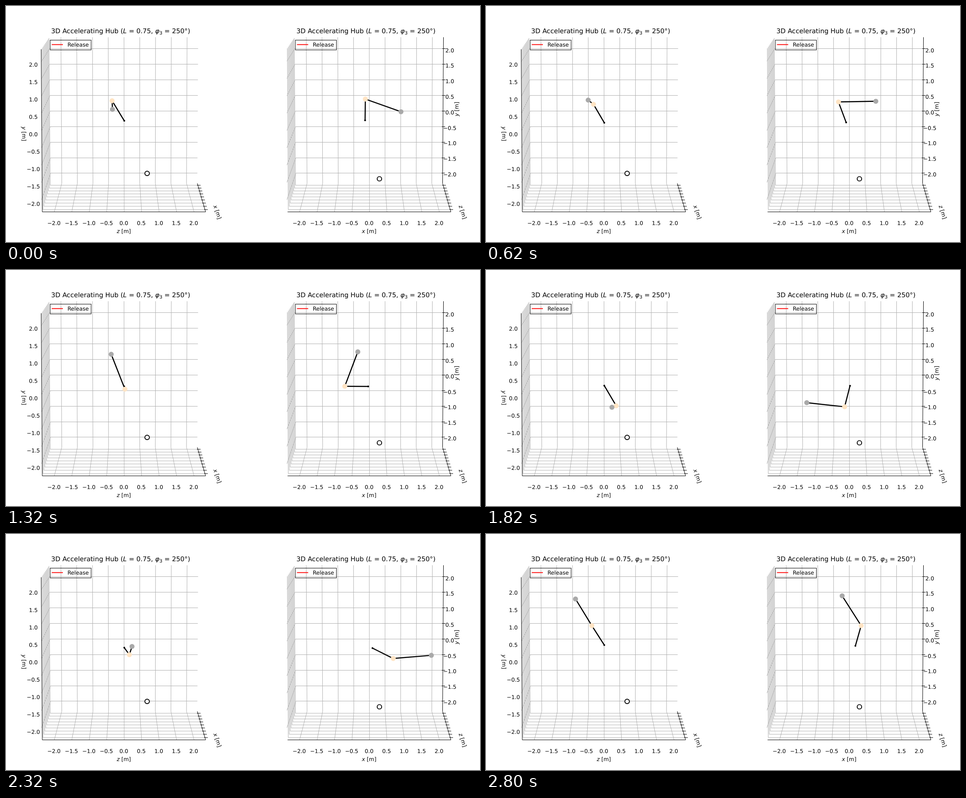
Write an HTML page that moves like this. It is 1058x529 px and loops after 2820 ms.

```html
<!DOCTYPE html>
<html lang="en">
<head>
<meta charset="utf-8">
<title>3D Accelerating Hub</title>
<style>
  html, body { margin: 0; width: 100%; height: 100%; overflow: hidden; background: #fff; }
  svg { display: block; width: 100%; height: 100%; }
  text { font: 12.2px "DejaVu Sans", sans-serif; text-anchor: middle; fill: #000; text-rendering: geometricPrecision; }
  text.title { font-size: 14.6px; }
  .i { font-style: italic; }
  .grid { stroke: #b0b0b0; stroke-width: 1; fill: none; }
  .axis { stroke: #000; stroke-width: 1; fill: none; }
  .rod { stroke: #000; stroke-width: 2.44; fill: none; stroke-linejoin: round; stroke-linecap: square; }
</style>
</head>
<body>
<svg id="stage" viewBox="0 0 1058 529"></svg>
<script>
const stage = document.getElementById('stage');
const LOOP = 2820, STEP = 20;
const ARM = 0.707, CLUB = 1.15, TILT = 31 * Math.PI / 180;
const SCALE = 74, MID_Y = 261, RISE = 9.2, DEPTH = 0.022;
const FRONT = 461.5, BACK = 397.5;

function add(parent, tag, attrs, html) {
  const el = document.createElementNS('http://www.w3.org/2000/svg', tag);
  for (const key in attrs) el.setAttribute(key, attrs[key]);
  if (html) el.innerHTML = html;
  parent.appendChild(el);
  return el;
}
const mix = (a, b, f) => a + (b - a) * f;
const line = (x1, y1, x2, y2) => `M${x1} ${y1}L${x2} ${y2}`;
const label = (parent, x, y, html, turn = 0, cls = '') =>
  add(parent, 'text', { transform: `translate(${x} ${y}) rotate(${turn})`, y: 4.4, class: cls }, html);
const axisName = name => `<tspan class="i">${name}</tspan> [m]`;
const tickText = v => v.toFixed(1).replace('-', '\u2212');
const ticks = Array.from({ length: 9 }, (_, i) => i / 2 - 2);

// Position along the receding direction, 0 at the front and 1 at the back.
function recede(v) {
  const f = (v + 2.35) / 4.7;
  return 1.104 * f / (1 + 0.104 * f);
}
const wallY = v => Math.floor(235.3 - v * 69.8) + 0.5;

function drawGrid(g) {
  let d = '';
  for (const v of ticks) {
    const f = recede(v), y = wallY(v), floorY = mix(FRONT, BACK, f);
    d += line(263.4 + v * 70.4, 70, 263.7 + v * 69.6, BACK) + `L${263.8 + v * 78} ${FRONT}`;
    d += line(79.5, 279 - v * 77.6, 98.5 - v * 0.6, y) + `L${428 + v * 0.4} ${y}`;
    d += line(mix(79, 97, f), mix(97, 70, f), mix(81, 100, f), floorY) + `L${mix(446, 427, f)} ${floorY}`;
  }
  add(g, 'path', { d, class: 'grid' });
}

function drawPanel(offset, across, away) {
  const g = add(stage, 'g', { transform: `translate(${offset} 0)` });
  drawGrid(g);
  let d = `M81 ${FRONT}H445.5L427 ${BACK}`;
  for (const v of ticks) {
    const f = recede(v), x = mix(446, 427, f);
    d += `M${x - 2} ${mix(FRONT, BACK, f)}h8`;
    label(g, 263 + v * 78, 486.5, tickText(v));
  }
  add(g, 'path', { d, class: 'axis' });
  label(g, 263, 504.5, axisName(across));
  label(g, 472, 462, axisName(away), 72);
  label(g, 256, 57,
    '3D Accelerating Hub (<tspan class="i">L</tspan> = 0.75, <tspan class="i">φ</tspan>' +
    '<tspan font-size="10.2" dy="2.3">3</tspan><tspan dy="-2.3"> = 250°)</tspan>', 0, 'title');
  add(g, 'rect', { x: 98.5, y: 76.5, width: 91.5, height: 22, fill: '#fff', class: 'axis' });
  add(g, 'path', { d: 'M102 86.5H127', stroke: '#f00', 'stroke-width': 1.83 });
  label(g, 161, 86.5, 'Release');
  return g;
}

const left = drawPanel(0, 'z', 'x');
const right = drawPanel(547.5, 'x', 'z');

add(left, 'path', { d: `M78.5 97L81 ${FRONT}`, class: 'axis' });
label(left, 40.5, 286.5, axisName('y'), 90);
let rightAxis = `M429 70L427 ${BACK}`;
for (const v of ticks) {
  label(left, 61, 287.5 - v * 78, tickText(v));
  label(right, 443, 238.3 - v * 69.6, tickText(v));
  rightAxis += `M${425.5 + v * 0.4} ${wallY(v)}h7.5`;
}
add(right, 'path', { d: rightAxis, class: 'axis' });
label(right, 458, 231, axisName('y'), -90);

const dot = (r, fill) => add(stage, 'circle', { r, fill });
function makeLinkage(project) {
  const rod = add(stage, 'path', { class: 'rod' });
  return { project, rod, dots: [dot(2, '#000'), dot(5.6, '#ffe4c4'), dot(5.6, '#a9a9a9')] };
}
const linkages = [
  makeLinkage(([x, y, z]) => {
    const s = SCALE * (1 - DEPTH * x);
    return [264 + z * s, MID_Y - y * s - RISE * x];
  }),
  makeLinkage(([x, y, z]) => {
    const s = SCALE * (1 + DEPTH * z);
    return [810 + x * s, MID_Y - y * s + RISE * z];
  })
];
for (const [cx, cy] of [[315, 375.3], [833.5, 387.4]])
  add(stage, 'circle', { cx, cy, r: 5, fill: '#fff', stroke: '#000', 'stroke-width': 1.9 });

// time, hub x, hub y, arm angle, arm offset from the swing plane, club angle, club offset
const poses = [
  [0, -0.115, 0.064, 89.4, -0.003, -17.1, -0.198],
  [300, -0.101, 0.025, 94.4, 0.015, -10.4, -0.235],
  [920, -0.061, -0.008, 133, 0.026, 26.7, -0.01],
  [1320, -0.02, 0.001, 180.4, 0.02, 70, 0.164],
  [1620, 0.012, 0.011, 226, 0.012, 128, 0.05],
  [1820, 0.034, 0.02, 256.8, 0.004, 172, -0.059],
  [2160, 0.083, 0.052, 306, -0.012, 302, -0.09],
  [2320, 0.108, 0.07, 332, -0.018, 362.3, 0.13],
  [2700, 0.176, 0.124, 411.5, -0.03, 456, 0.14],
  [2800, 0.196, 0.14, 435.5, -0.031, 480.3, 0.031]
];

function slope(i, k) {
  const a = poses[Math.max(i - 1, 0)], b = poses[i], c = poses[Math.min(i + 1, poses.length - 1)];
  if (a === b || b === c) return (c[k] - a[k]) / (c[0] - a[0]);
  const h = b[0] - a[0], j = c[0] - b[0];
  return ((b[k] - a[k]) / h * j + (c[k] - b[k]) / j * h) / (h + j);
}

function sample(t, k) {
  let i = 0;
  while (i < poses.length - 2 && t >= poses[i + 1][0]) i++;
  const a = poses[i], b = poses[i + 1], h = b[0] - a[0], u = (t - a[0]) / h, w = 1 - u;
  return w * w * (1 + 2 * u) * a[k] + u * u * (3 - 2 * u) * b[k]
    + h * u * w * (w * slope(i, k) - u * slope(i + 1, k));
}

// A vector given in the tilted swing plane, added to a point in space.
function reach([x, y, z], length, degrees, normal) {
  const a = degrees * Math.PI / 180, r = Math.sqrt(length * length - normal * normal);
  const up = r * Math.sin(a), c = Math.cos(TILT), s = Math.sin(TILT);
  return [x + r * Math.cos(a), y + up * c + normal * s, z - up * s + normal * c];
}

function draw(t) {
  const [hubX, hubY, arm, armOff, club, clubOff] = [1, 2, 3, 4, 5, 6].map(k => sample(t, k));
  const hub = [hubX, hubY, 0];
  const elbow = reach(hub, ARM, arm, armOff);
  const tip = reach(elbow, CLUB, club, clubOff);
  for (const { project, rod, dots } of linkages) {
    const points = [hub, elbow, tip].map(project);
    rod.setAttribute('d', 'M' + points.map(p => p.join(' ')).join('L'));
    points.forEach(([x, y], i) => {
      dots[i].setAttribute('cx', x);
      dots[i].setAttribute('cy', y);
    });
  }
}

const start = performance.now();
function tick() {
  const t = (performance.now() - start) % LOOP;
  draw(Math.floor(t / STEP) * STEP);
  requestAnimationFrame(tick);
}
tick();
</script>
</body>
</html>
```
